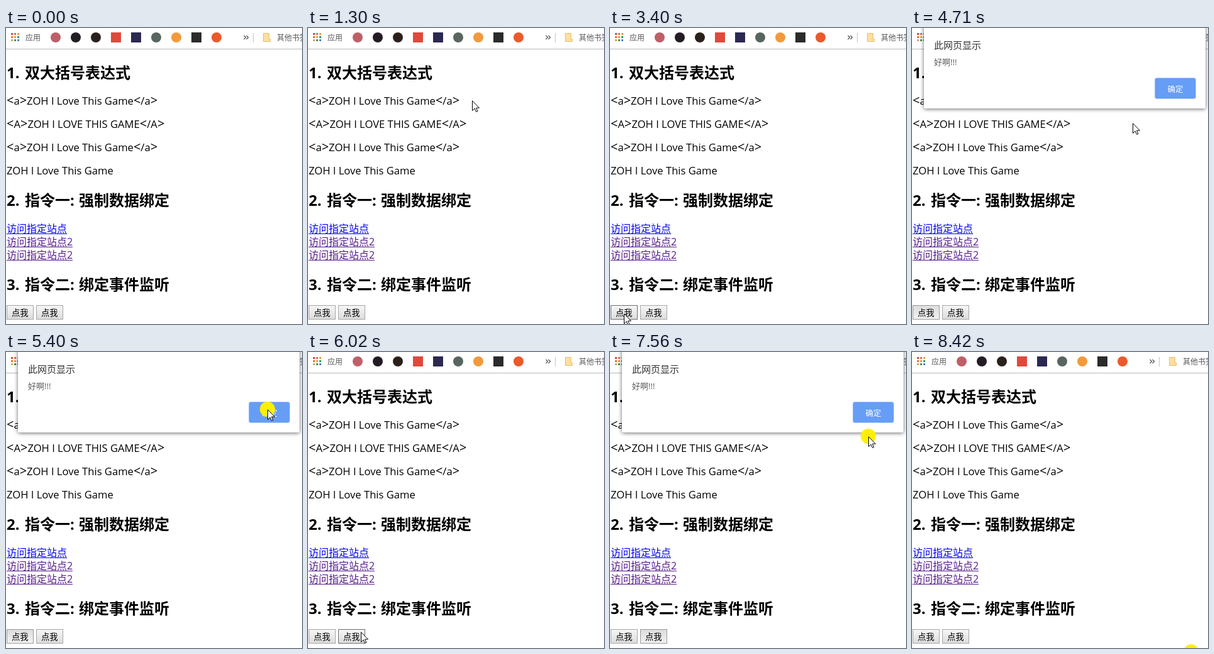
Write an HTML page that moves like this. It is 471 px wide and 471 px high and loops after 8.5 s.

```html
<!DOCTYPE html>
<html lang="zh-CN">
<head>
<meta charset="utf-8">
<title>指令演示</title>
<style>
  html, body { margin: 0; width: 100%; height: 100%; overflow: hidden; background: #fff; }
  svg { display: block; width: 471px; height: 471px; }
  text { font-family: "Open Sans", "Noto Sans CJK SC", "Noto Sans CJK", sans-serif; }
  .p { font-size: 16.6px; }
  .angle { font-size: 20px; }
  .h { font-size: 24px; font-weight: 700; }
  .a { font-size: 16px; fill: #551a8b; }
  .a.fresh { fill: #00e; }
  .bar { font-size: 12px; fill: #5a5a5a; }
  .btn text { font-size: 13.33px; }
  .btn rect { fill: url(#up); stroke: #a6a6a6; }
  .btn.hover rect { stroke: #6e6e6e; }
  .btn.down rect { fill: url(#down); stroke: #9a9a9a; }
  #panel { filter: drop-shadow(0 1px 3px rgba(0, 0, 0, .6)); }
  #ring { fill: #fff000; }
  .cursor path { fill: #fff; stroke: #000; }
  #beam path { fill: none; }
</style>
</head>
<body>
<svg viewBox="0 0 471 471">
  <defs>
    <linearGradient id="up" x2="0" y2="1">
      <stop offset="0" stop-color="#f6f6f6"/><stop offset="1" stop-color="#dcdcdc"/>
    </linearGradient>
    <linearGradient id="down" x2="0" y2="1">
      <stop offset="0" stop-color="#dcdcdc"/><stop offset="1" stop-color="#f2f2f2"/>
    </linearGradient>
  </defs>

  <g id="bookmarks">
    <text class="bar" x="31" y="20">应用</text>
    <path d="M378.5 12l3 3-3 3m4-6l3 3-3 3" fill="none" stroke="#5a5a5a" stroke-width="1.4"/>
    <path d="M393.500 8V23" stroke="#c4c4c4"/>
    <path d="M409.500 8.500h9v9h2v4h-11z" fill="#fddf9f" stroke="#ebbd6c"/>
    <text class="bar" x="431" y="20">其他书签</text>
    <path d="M0 33.500H471" stroke="#b9b9b9"/>
  </g>

  <g id="page"></g>

  <g id="dialog">
    <rect id="panel" x="19" y="-10" width="448" height="138" rx="2" fill="#fff"/>
    <text x="35" y="32.500" font-size="15" fill="#333">此网页显示</text>
    <text x="35" y="59" font-size="13" fill="#5a5a5a">好啊!!!</text>
    <rect x="386.500" y="79.500" width="65" height="33" rx="3" fill="#669df6" stroke="#a9c8fa"/>
    <text x="406.500" y="101.500" font-size="12.5" fill="#fff">确定</text>
  </g>

  <circle id="ring" r="12"/>
  <g class="cursor" id="arrow"><path d="M.5 .8V16.500L4.200 13 6.600 18.400 8.900 17.400 6.600 12.100H11.500Z"/></g>
  <g class="cursor" id="beam"><path d="M-3.500-7.500H3.500M0-7.500V7.500M-3.500 7.500H3.500"/></g>
  <g class="cursor" id="hand"><path d="M-1.500 10V1.500a1.500 1.500 0 0 1 3 0V7l7 1.500a3 3 0 0 1 2 3V15l-2 5h-8l-5-7.500q-2-3 3-.5Z"/></g>
</svg>
<script>
const LOOP = 8500, TICK = 77, REACT = 160;
const $ = id => document.getElementById(id);

function add(parent, tag, attrs, html = '') {
  const el = document.createElementNS('http://www.w3.org/2000/svg', tag);
  for (const k in attrs) el.setAttribute(k, attrs[k]);
  el.innerHTML = html;
  return parent.appendChild(el);
}

// bookmark bar
const hues = ['#db4437', '#e2703a', '#eba03a', '#2f9a5f', '#4a80d8'];
for (let i = 0; i < 9; i++) {
  const col = i % 3, row = (i - col) / 3;
  add($('bookmarks'), 'rect', { x: 8 + col * 5, y: 8 + row * 5, width: 3, height: 3, fill: hues[col + row] });
}
const round = ['#bf5f68', '#241c24', '#2a211d', , , '#59655f', '#f29a3c', , '#ea5a2b'];
const square = { 3: '#de4a3c', 4: '#2b2950', 7: '#2b2b2b' };
for (let i = 0; i < 9; i++) {
  const x = 79 + 32 * i;
  if (square[i]) add($('bookmarks'), 'rect', { x: x - 8, y: 7, width: 16, height: 16, fill: square[i] });
  else add($('bookmarks'), 'circle', { cx: x, cy: 15, r: 8, fill: round[i] });
}

// page
const page = $('page');
const line = (cls, y, html) => add(page, 'text', { class: cls, x: 1, y }, html);
const heading = (y, n, title, rest = '') =>
  line('h', y, `${n}.<tspan x="30">${title}</tspan><tspan x="116">${rest}</tspan>`);

heading(79.5, 1, '双大括号表达式');
const slogan = 'ZOH I Love This Game';
const tagged = `<a>${slogan}</a>`;
[tagged, tagged.toUpperCase(), tagged, slogan].forEach((s, i) => {
  line('p', 122 + 37 * i, s.replace(/[<>]/g, c => `<tspan class="angle">${c === '<' ? '&lt;' : '&gt;'}</tspan>`));
});
heading(282.5, 2, '指令一:', '强制数据绑定');
['', '2', '2'].forEach((suffix, i) => {
  const link = add(page, 'g', { class: i ? 'a' : 'a fresh' });
  add(link, 'text', { x: 1, y: 325 + 21 * i }, '访问指定站点' + suffix);
  add(link, 'rect', { x: 1, y: 327 + 21 * i, width: suffix ? 105 : 96, height: 1 });
});
heading(416.5, 3, '指令二:', '绑定事件监听');
const buttons = [1, 48].map(x => {
  const b = add(page, 'g', { class: 'btn' });
  add(b, 'rect', { x: x + .5, y: 441.5, width: 42, height: 22 });
  add(b, 'text', { x: x + 8, y: 458 }, '点我');
  return b;
});
const words = [...page.querySelectorAll('.h, .p')];
const links = [...page.querySelectorAll('.a')];

// pointer journey: each leg ends at x, y
const home = { x: 392, y: 482 };
const legs = [
  { from: 130, to: 670, x: 325, y: 330 },
  { from: 840, to: 1380, x: 255, y: 96 },
  { from: 1530, to: 2370, x: 116.5, y: 395 },
  { from: 2450, to: 3000, x: 22, y: 446 },
  { from: 3400, to: 3400, x: 22, y: 454 },
  { from: 4480, to: 5250, x: 416, y: 91, ease: 4 },
  { from: 5560, to: 6170, x: 75, y: 455, ease: 2.4 },
  { from: 6490, to: 7180, x: 406, y: 88, ease: 2.5 },
  { from: 7560, to: 8260, x: 444, y: 477 },
];
const clicks = [4010, 5400, 6330, 7410, 8420];

function pointer(t) {
  const i = legs.findLastIndex(leg => t >= leg.from);
  if (i < 0) return home;
  const { from, to, x, y, ease = 1.2 } = legs[i];
  const start = legs[i - 1] || home;
  const steps = Math.round((to - from) / TICK) + 1;
  const step = Math.floor((t - from) / TICK + .1) + 1;
  const f = 1 - (1 - Math.min(1, step / steps)) ** ease;
  return { x: Math.round(start.x + (x - start.x) * f), y: Math.round(start.y + (y - start.y) * f) };
}

function over(el, { x, y }) {
  const b = el.getBBox();
  return x >= b.x && x <= b.x + b.width && y >= b.y && y <= b.y + b.height;
}

const show = (el, on) => { el.style.display = on ? '' : 'none'; };

function draw(t) {
  const at = pointer(t);
  const hit = el => over(el, at);
  let open = false;

  // even clicks press a button, odd ones confirm its alert
  buttons.forEach((b, i) => {
    const press = clicks[2 * i], close = clicks[2 * i + 1] + REACT;
    const age = t - press - REACT;
    b.classList.toggle('down', t >= press && t < close);
    if (age < 0 || t >= close) return;
    open = true;
    $('dialog').style.opacity = Math.min(1, (Math.floor(age / TICK) + 1) / 3);
  });
  buttons.forEach(b => b.classList.toggle('hover', !open && hit(b)));
  show($('dialog'), open);
  show($('ring'), clicks.some(c => t >= c && t < c + REACT));

  const kind = open ? 'arrow' : links.some(hit) ? 'hand' : words.some(hit) ? 'beam' : 'arrow';
  for (const id of ['arrow', 'beam', 'hand']) show($(id), id === kind);
  for (const id of ['ring', kind]) $(id).setAttribute('transform', `translate(${at.x} ${at.y})`);
}

function tick() {
  draw(performance.now() % LOOP);
  requestAnimationFrame(tick);
}
tick();
</script>
</body>
</html>
```
